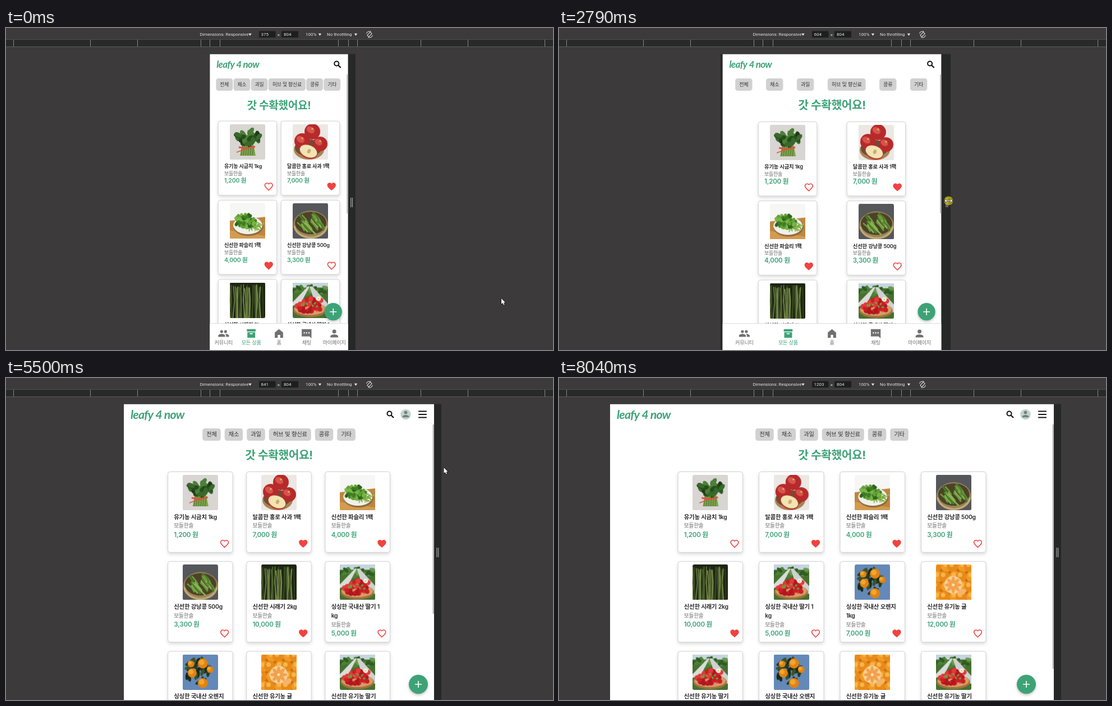
Animation of 975x575 px, one loop 8.17 s. Source, as an HTML page with a canvas:

```html
<!DOCTYPE html>
<html lang="ko">
<head>
<meta charset="utf-8">
<style>
html, body { margin: 0; width: 100%; height: 100%; overflow: hidden; background: #3c3a3b; }
canvas { display: block; }
</style>
</head>
<body>
<canvas id="stage" width="975" height="575"></canvas>
<script>
const LOOP = 8170, STEP = 68.67, SCALE = 0.6575, MID = 486.5, TOP = 46.5;
const GREEN = '#3da377', RED = '#f04340';
const SANS = "Inter, 'Noto Sans CJK KR', sans-serif";
const stage = document.getElementById('stage').getContext('2d');
let g = stage;

// [time, viewport width]
const WIDTHS = [[1630, 375], [1980, 407], [2318, 473], [2455, 512], [3279, 733], [3690, 841],
  [5980, 841], [6737, 1047], [6806, 1057], [7560, 1203]];
// [time, x, y]
const POINTER = [[0, 883, 483], [720, 614, 305], [1630, 614, 304], [2318, 651, 307], [3279, 737, 310],
  [3960, 771, 310], [4600, 743, 65], [4880, 743, 65], [5440, 780.5, 160], [5650, 780.5, 160],
  [5850, 771, 165], [6737, 840, 170], [7640, 890, 170], [8000, 990, 190]];
const STARTS = [0, 70, 900, 1560, 1700, 4020, 5710, 6050, 7700];

const smooth = k => k * k * (3 - 2 * k);
function track(keys, t, col, ease = k => k) {
  const i = keys.findIndex(k => k[0] > t);
  if (i === 0) return keys[0][col];
  if (i < 0) return keys.at(-1)[col];
  const a = keys[i - 1], b = keys[i];
  return a[col] + (b[col] - a[col]) * ease((t - a[0]) / (b[0] - a[0]));
}
const between = (t, a, b) => t >= a && t < b;

function rect(x, y, w, h, color, r = 0) {
  g.fillStyle = color;
  g.beginPath();
  g.roundRect(x, y, w, h, r);
  g.fill();
}
function oval(x, y, rx, ry, color, turn = 0) {
  g.fillStyle = color;
  g.beginPath();
  g.ellipse(x, y, rx, ry, turn, 0, 7);
  g.fill();
}
const disc = (x, y, r, color) => oval(x, y, r, r, color);
function line(points, color, width) {
  g.strokeStyle = color;
  g.lineWidth = width;
  g.beginPath();
  points.forEach(([x, y]) => g.lineTo(x, y));
  g.stroke();
}
function poly(points, color) {
  g.fillStyle = color;
  g.beginPath();
  points.forEach(([x, y]) => g.lineTo(x, y));
  g.fill();
}
function setFont(size, weight = 400, family = SANS) {
  g.font = `${weight} ${size}px ${family}`;
  g.letterSpacing = family === SANS ? `${-0.02 * size}px` : '0px';
}
function text(str, x, y, color, align = 'left') {
  g.fillStyle = color;
  g.textAlign = align;
  g.textBaseline = 'middle';
  g.fillText(str, x, y);
}
function shadow(color, blur, dy) {
  g.shadowColor = color;
  g.shadowBlur = blur;
  g.shadowOffsetY = dy;
}
const noShadow = () => shadow('transparent', 0, 0);

const PATHS = {
  heart: 'M12 21.3l-1.4-1.3C5.4 15.4 2 12.3 2 8.5 2 5.4 4.4 3 7.5 3c1.7 0 3.4.8 4.5 2.1C13.1 3.8 14.8 3 16.5 3 19.6 3 22 5.4 22 8.5c0 3.8-3.4 6.9-8.6 11.5z',
  people: 'M16 11a3 3 0 1 0 0-6 3 3 0 0 0 0 6zM8 11a3 3 0 1 0 0-6 3 3 0 0 0 0 6zM8 13c-2.3 0-7 1.2-7 3.5V19h14v-2.5C15 14.2 10.3 13 8 13zM16 13l-1 .1c1.2.8 2 1.9 2 3.4V19h6v-2.5c0-2.3-4.7-3.5-7-3.5z',
  box: 'M3 3h18v5H3zM4 9.3h16V21H4zM9 11.5h6v2H9z',
  home: 'M12 3l-8.5 7V21h6v-6h5v6h6V10z',
  chat: 'M2 3h20v19l-4-4H2zM6 9.5h2.4v2.4H6zM10.8 9.5h2.4v2.4h-2.4zM15.6 9.5H18v2.4h-2.4z',
  person: 'M12 12a4 4 0 1 0 0-8 4 4 0 0 0 0 8zM4 20v-2c0-2.7 5.3-4 8-4s8 1.3 8 4v2z'
};
for (const k in PATHS) PATHS[k] = new Path2D(PATHS[k]);

function icon(name, x, y, scale, color, outline) {
  g.save();
  g.translate(x, y);
  g.scale(scale, scale);
  g.translate(-12, -12);
  g.fillStyle = g.strokeStyle = color;
  g.lineWidth = 2.3;
  if (outline) g.stroke(PATHS[name]);
  else g.fill(PATHS[name], 'evenodd');
  g.restore();
}

function randomizer(seed) {
  return () => (seed = (seed * 16807) % 2147483647) / 2147483647;
}
// Scatter ovals inside an ellipse.
function scatter(n, seed, x, y, w, h, rx, ry, colors) {
  const rnd = randomizer(seed);
  for (let i = 0; i < n; i++) {
    const a = rnd() * 6.28, d = Math.sqrt(rnd());
    oval(x + Math.cos(a) * d * w, y + Math.sin(a) * d * h, rx, ry, colors[i % colors.length], rnd() * 3);
  }
}

const PHOTOS = {
  spinach() {
    rect(0, 0, 63, 63, '#d8d5d3');
    poly([[22, 36], [42, 36], [46, 56], [18, 56]], '#7fa24a');
    for (let x = 22; x < 45; x += 4) line([[x, 38], [x - 2, 56]], '#4b7430', 1);
    scatter(34, 11, 32, 24, 20, 13, 7, 4, ['#264d1d', '#39692b', '#1c3b16', '#4d7f38']);
    line([[16, 41], [30, 43], [45, 40]], '#df5142', 3);
    line([[30, 43], [12, 50]], '#df5142', 1.5);
  },
  apples() {
    rect(0, 0, 63, 63, '#ebe7e2');
    oval(29, 45, 27, 18, '#a88355');
    oval(28, 42, 24, 15, '#6e4d35');
    [[35, 13, 14], [17, 30, 14], [49, 35, 13]].forEach(([x, y, r]) => {
      disc(x, y, r, '#b72a2c');
      oval(x - 3, y - 3, r * .55, r * .4, '#d6534a', .6);
      disc(x, y - 5, 1.8, '#d9b45b');
    });
    oval(28, 49, 17, 12, '#bd382f', .4);
    oval(28, 48, 16, 10.5, '#f2e5b5', .4);
    oval(29, 48, 3, 4, '#cfae6a', .4);
  },
  parsley() {
    rect(0, 0, 63, 63, '#f6f6f4');
    poly([[0, 31], [63, 24], [63, 63], [0, 63]], '#bd8640');
    poly([[0, 48], [63, 58], [63, 63], [0, 63]], '#d29b51');
    oval(33, 41, 27, 17, '#8f6736');
    oval(32, 39, 26, 16, '#f0f1eb');
    scatter(20, 8, 45, 41, 14, 7, 5, 1.2, ['#79a83c', '#93bd55']);
    scatter(46, 5, 29, 32, 19, 12, 4.5, 3, ['#3f7d22', '#62a235', '#2f6419', '#7ab548']);
  },
  beans() {
    rect(0, 0, 63, 63, '#55575b');
    oval(32, 38, 31, 25, '#9c8557');
    oval(32, 35, 28, 20, '#4b4227');
    const rnd = randomizer(21);
    for (let i = 0; i < 26; i++) {
      const x = 8 + rnd() * 36, y = 15 + rnd() * 25;
      line([[x, y], [x + 4 + rnd() * 5, y + 7], [x + 10 + rnd() * 5, y + 15]],
        ['#6f9e3d', '#4e7c2b', '#88b552'][i % 3], 2.7);
    }
    g.strokeStyle = '#c4ad7a';
    g.lineWidth = 3;
    g.beginPath();
    g.ellipse(32, 38, 29, 23, 0, .1, 3.04);
    g.stroke();
  },
  greens() {
    rect(0, 0, 63, 63, '#1d2513');
    const rnd = randomizer(33);
    for (let i = 0; i < 42; i++) {
      const x = rnd() * 63, y = 3 + rnd() * 8;
      line([[x, y], [x + rnd() * 4 - 2, 32], [x + rnd() * 4 - 2, 63]],
        ['#61763a', '#82964f', '#435728', '#303f1e'][i % 4], 1 + rnd());
    }
  },
  berries() {
    rect(0, 0, 63, 63, '#47702f');
    rect(0, 0, 63, 9, '#c6d5df');
    scatter(24, 4, 32, 13, 32, 8, 6, 3, ['#4c8236', '#2f5b24', '#6b9a4b']);
    poly([[30, 7], [35, 7], [63, 38], [63, 52], [45, 52]], '#cfd1d0');
    poly([[27, 7], [30, 7], [16, 34], [0, 42], [0, 35]], '#d9ddd9');
    oval(31, 49, 30, 13, '#a4703f');
    oval(31, 47, 28, 11, '#d3a064');
    scatter(32, 17, 31, 40, 24, 13, 5, 4.3, ['#c91f26', '#e23a38', '#b3161f']);
    scatter(8, 9, 31, 37, 20, 9, 2.5, 1.5, ['#6ba541']);
    disc(46, 29, 4, '#f4f3e9');
    disc(46, 29, 1.5, '#e6c843');
  },
  oranges() {
    rect(0, 0, 63, 63, '#6489b8');
    scatter(32, 13, 26, 29, 20, 23, 7, 3, ['#243a1e', '#38532a', '#182917']);
    [[36, 16, 9], [17, 33, 8], [36, 51, 9], [49, 27, 6], [15, 17, 6]].forEach(([x, y, r]) => {
      disc(x, y, r, '#e28312');
      disc(x - 2, y - 2, r * .55, '#f5a52d');
    });
  },
  tangerines() {
    rect(0, 0, 63, 63, '#c96f14');
    for (let i = 0; i < 20; i++) {
      const x = (i % 5) * 15 + (i % 2) * 4, y = Math.floor(i / 5) * 18 + 3;
      disc(x, y, 10, i % 2 ? '#f29b25' : '#e98a18');
      disc(x - 2, y - 3, 4, '#f8b64c');
    }
    disc(31, 36, 16, '#f5d199');
    for (let a = 0; a < 6.2; a += .785) oval(31 + Math.cos(a) * 8, 36 + Math.sin(a) * 8, 7, 3, '#f3a14b', a);
    disc(31, 36, 2.5, '#fae5bd');
    oval(46, 49, 9, 5, '#f6b467', -.5);
  }
};
for (const k in PHOTOS) {
  const c = document.createElement('canvas');
  c.width = c.height = 63;
  g = c.getContext('2d');
  g.beginPath();
  g.roundRect(0, 0, 63, 63, 2.5);
  g.clip();
  PHOTOS[k]();
  PHOTOS[k] = c;
}
g = stage;

// photo, name (| marks a line break), price, liked
const GOODS = [
  ['spinach', '유기농 시금치 1kg', '1,200', 0],
  ['apples', '달콤한 홍로 사과 1팩', '7,000', 1],
  ['parsley', '신선한 파슬리 1팩', '4,000', 1],
  ['beans', '신선한 강낭콩 500g', '3,300', 0],
  ['greens', '신선한 시래기 2kg', '10,000', 1],
  ['berries', '싱싱한 국내산 딸기 1|kg', '5,000', 0],
  ['oranges', '싱싱한 국내산 오렌지|1kg', '7,000', 1],
  ['tangerines', '신선한 유기농 귤', '12,000', 0],
  ['berries', '신선한 유기농 딸기', '5,000', 0],
  ['oranges', '싱싱한 국내산 오렌지|1kg', '7,000', 1],
  ['tangerines', '신선한 유기농 귤', '12,000', 0],
  ['berries', '신선한 유기농 딸기', '5,000', 0]
];
const CHIPS = ['전체', '채소', '과일', '허브 및 향신료', '콩류', '기타'];
const TABS = [['people', '커뮤니티'], ['box', '모든 상품'], ['home', '홈'], ['chat', '채팅'], ['person', '마이페이지']];

function card([photo, name, price, liked], x, y, big, tiny) {
  const w = big ? 115.5 : 104.5, h = big ? 144 : 132.5, gap = big ? 16 : 13;
  shadow('rgba(0,0,0,.16)', 6, 3);
  rect(x, y, w, h, '#fff', 4);
  noShadow();
  g.strokeStyle = '#d2d2d2';
  g.lineWidth = 1;
  g.stroke();
  g.drawImage(PHOTOS[photo], x + w / 2 - 31.5, y + 5.7);
  let ty = y + 81;
  const row = (str, color) => { text(str, x + 10.7, ty, color); ty += gap; };
  setFont(big ? 10.4 : tiny ? 9.1 : 9.3, 600);
  name.split('|').forEach(part => row(part, '#282828'));
  setFont(big ? 9.7 : 8.9);
  row('보들한솔', '#6c6c6c');
  setFont(tiny ? 10.6 : 11.6, 600);
  row(price + ' 원', GREEN);
  icon('heart', x + w - 14.5, y + h - 15.5, liked ? .77 : .69, RED, !liked);
}

function chips(left, p, big, tiny) {
  setFont(big ? 10.3 : tiny ? 8.8 : 9.1, 400);
  const widths = CHIPS.map(c => g.measureText(c).width + 14);
  const total = widths.reduce((a, b) => a + b);
  const gap = big ? 7 : (p - 23.5 - total) / 6;
  let x = big ? MID - (total + 35) / 2 : left + 10.5 + gap / 2;
  CHIPS.forEach((c, i) => {
    rect(x, 90, widths[i], 22, '#d1d1d1', 4.5);
    text(c, x + widths[i] / 2, 101, '#333', 'center');
    x += widths[i] + gap;
  });
}

function header(left, right, desktop) {
  const sx = right - (desktop ? 78 : 19);
  setFont(desktop ? 21.4 : 17, 'italic 700', 'Lato, sans-serif');
  g.letterSpacing = desktop ? '-0.8px' : '-0.65px';
  text('leafy 4 now', left + 12, 66, GREEN);
  g.strokeStyle = '#111';
  g.lineWidth = 2;
  g.beginPath();
  g.arc(sx - 1.5, 63.5, 4, 0, 7);
  g.stroke();
  line([[sx + 1.5, 66.5], [sx + 6, 71]], '#111', 2.3);
  if (!desktop) return;
  disc(right - 50.5, 65, 9.3, '#c4d2cc');
  icon('person', right - 50.5, 64.5, .72, '#6d837b');
  for (const y of [59.5, 65, 70.5]) rect(right - 28, y - 1.1, 15, 2.2, '#111', .8);
}

function page(p) {
  const left = MID - p / 2, right = MID + p / 2;
  const tiny = p < 263, big = p >= 421, desktop = p >= 505, wide = p >= 673;
  const cols = wide ? 4 : desktop ? 3 : 2;
  const pitch = wide ? 144.5 + (p - 791) * .18
    : desktop ? 140.2 + (p - 553) * .183
    : p > 306 ? 136.2 + (p - 306) * .257 : 112.2 + (p - 247) * .41;
  g.save();
  g.beginPath();
  g.rect(left, TOP, p, 529);
  g.clip();
  rect(left, TOP, p, 529, '#fff');
  header(left, right, desktop);
  chips(left, p, big, tiny);
  setFont(tiny ? 19.2 : 20.3, 700);
  text('갓 수확했어요!', MID, 139, GREEN, 'center');

  const w = big ? 115.5 : 104.5;
  GOODS.slice(0, cols * 3).forEach((item, i) => {
    const x = MID + (i % cols - (cols - 1) / 2) * pitch - w / 2;
    const y = (tiny ? 166.2 : 167.4) + Math.floor(i / cols) * (desktop ? 160.3 : big ? 152.5 : 141.3);
    card(item, x, y, big, tiny);
  });

  rect(right - 2.5, 83, 2.5, wide ? 436 : desktop ? 338 : big ? 232 : 248, '#b9b9b9');
  if (!desktop) {
    rect(left, 528, p, 48, '#fff');
    rect(left, 527.3, p, 1, '#dcdcdc');
    setFont(9.1);
    TABS.forEach(([shape, label], i) => {
      const x = left + (i + .5) * p / 5, color = i === 1 ? GREEN : '#707070';
      icon(shape, x, 545.5, .87, color);
      text(label, x, 562.7, color, 'center');
    });
  }
  const fx = right - (wide ? 49 : desktop ? 28 : 26.5), fy = desktop ? 547 : 506.7;
  shadow('rgba(0,0,0,.25)', 5, 2);
  disc(fx, fy, desktop ? 17 : 15.6, GREEN);
  noShadow();
  line([[fx - 6, fy], [fx + 6, fy]], '#fff', 1.6);
  line([[fx, fy - 6], [fx, fy + 6]], '#fff', 1.6);
  g.restore();
}

function toolbar(width) {
  const color = '#e3e3e3', caret = x => poly([[x - 2.7, 9.8], [x + 2.7, 9.8], [x, 14]], color);
  rect(0, 20, 975, 14, '#282a2a');
  rect(0, 20, 975, 1, '#504f50');
  rect(0, 33, 975, 1, '#5c5b5c');
  for (const w of [320, 375, 425, 768, 1024, 1440])
    for (const side of [-1, 1]) rect(Math.round(MID + side * w * SCALE / 2), 21, 1, 12, '#858585');
  rect(451, 5.5, 29.5, 11.5, '#1d1f1f', 1);
  rect(491, 5.5, 30, 11.5, '#1d1f1f', 1);
  setFont(8, 400, 'Roboto, sans-serif');
  text('Dimensions: Responsive', 345.5, 12, color);
  text(width, 454.5, 12, color);
  text('×', 486, 12.5, color, 'center');
  text('804', 495, 12, color);
  text('100%', 534, 12, color);
  text('No throttling', 572, 12, color);
  [435, 559.5, 623.5].forEach(caret);
  g.save();
  g.translate(648, 11.5);
  g.rotate(.75);
  g.strokeStyle = color;
  g.lineWidth = 1;
  g.strokeRect(-2, -4, 4, 8);
  for (const a of [-.5, 2.64]) {
    g.beginPath();
    g.arc(0, 0, 5.6, a, a + 1.8);
    g.stroke();
  }
  g.restore();
}

function pointer(t, handle, right) {
  const dragging = between(t, 1700, 3755) || between(t, 6040, 7640);
  const x = dragging ? handle + 3 : track(POINTER, t, 1, smooth), y = track(POINTER, t, 2, smooth);
  if (between(t, 1555, 3755) || between(t, 4600, 4880) || between(t, 5980, 7690))
    disc(x, y, 8, 'rgba(224,214,0,.62)');
  if (between(t, 765, 4020) || between(t, 5770, 7695)) {
    for (const [color, width] of [['#222', 2.6], ['#fff', 1.2]]) {
      line([[x - 6, y], [x + 6, y]], color, width);
      for (const s of [-1, 1]) line([[x + s * 3.5, y - 2.5], [x + s * 6, y], [x + s * 3.5, y + 2.5]], color, width);
    }
  } else if (x < right) {
    if (!between(t, 4590, 4880)) disc(x, y, 7, 'rgba(90,90,90,.3)');
  } else {
    const arrow = [[0, 0], [0, 10], [2.3, 8], [4, 11.6], [5.6, 10.9], [4, 7.4], [7, 7.2], [0, 0]]
      .map(([a, b]) => [x + a, y + b]);
    line(arrow, '#111', 1.4);
    poly(arrow, '#fff');
  }
}

function draw(now) {
  const time = now % LOOP, start = STARTS.findLast(s => s <= time);
  const t = start + Math.floor((time - start + 10) / STEP) * STEP;
  const width = track(WIDTHS, t, 1), half = width * SCALE / 2;
  const p = track(WIDTHS, t - (t < 5000 ? 40 : 92), 1) * SCALE;
  const handle = MID + half + 6.2;
  rect(0, 0, 975, 575, '#3c3a3b');
  toolbar(Math.round(width));
  rect(MID - half, TOP, half * 2 + 13, 529, '#262828');
  for (const dx of [-1.8, .9]) rect(handle + dx, 303, 1.1, 17, '#b4b4b4');
  page(p);
  pointer(t, handle, MID + p / 2);
  requestAnimationFrame(draw);
}
requestAnimationFrame(draw);
</script>
</body>
</html>
```
